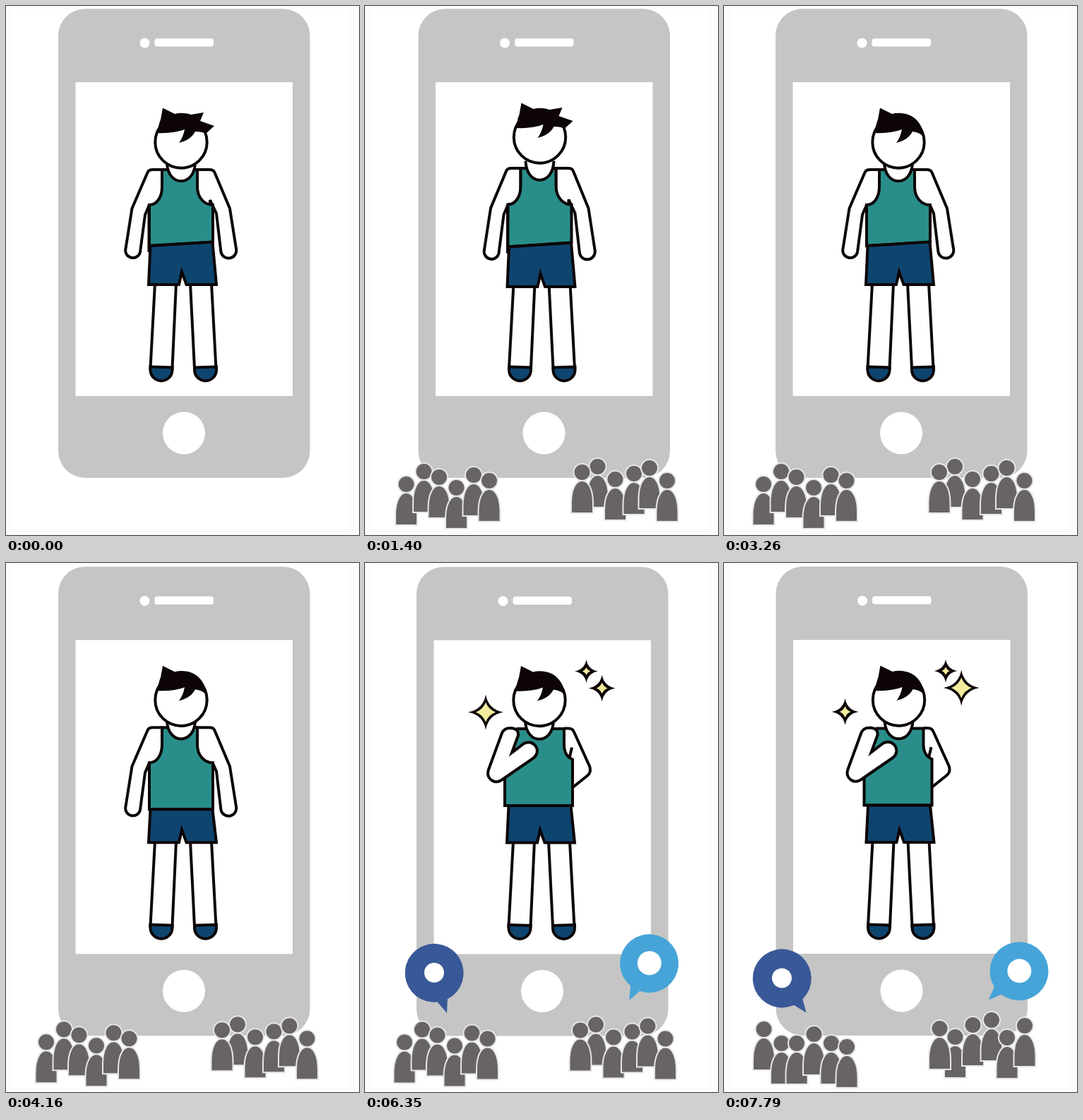
These frames come from a looping animation (500 by 750 pixels, 9990 ms). An HTML page:

```html
<!DOCTYPE html>
<html lang="en">
<head>
<meta charset="utf-8">
<title>Getting ready for the audience</title>
<style>
  html, body { margin: 0; width: 100%; height: 100%; overflow: hidden; background: #fcfcfc; }
  svg { display: block; width: 100vw; height: 100vh; }
  .ink { stroke: #0c0406; stroke-width: 4; fill: #fff; }
  .shirt { fill: #298e8a; }
  .navy { fill: #0e456f; }
  .hair { fill: #0c0406; }
  .crowd { fill: #686464; stroke: #e6e6e6; stroke-width: 2; }
</style>
</head>
<body>
<svg id="stage" viewBox="0 0 500 750"></svg>
<script>
const LOOP = 9990;
const stage = document.getElementById('stage');

const path = (d, cls = 'ink', extra = '') => `<path class="${cls}" d="${d}" ${extra}/>`;
const circle = (x, y, r, attrs) => `<circle cx="${x}" cy="${y}" r="${r}" ${attrs}/>`;
const group = (transform, content) => `<g transform="${transform}">${content}</g>`;

function phone() {
  return `<rect x="74" y="4" width="356.5" height="665" rx="38" fill="#c5c5c5"/>
    <g fill="#fff"><rect x="98.5" y="108" width="307.5" height="445"/>
    <rect x="210.5" y="46" width="83.5" height="11.5" rx="4"/>
    <circle cx="196.5" cy="52.5" r="7"/><circle cx="252" cy="605.5" r="30"/></g>`;
}

function legs() {
  return path('M211 393L204.5 514H235.5L241 393') +
    path('M261 393L267 514H297.5L291 393') +
    path('M204.5 511.5L235.5 512.5V516A15.5 15.5 0 0 1 204.5 516Z', 'ink navy') +
    path('M267 512.5L298 511.5V516A15.5 15.5 0 0 1 267 516Z', 'ink navy');
}

const shorts = (left, right) =>
  path(`M204.5 ${left}L202 395H245L249 377L255.5 395H298L292.5 ${right}Z`, 'ink navy');

const collar = path('M228 222C229 257 267 257 268 222');

function head(messy) {
  const front = messy
    ? 'L280 151L275 163L295 170L283 181Q278 178 268 178'
    : 'Q281 161 285 187Q279 179 268 178';
  return circle(248, 193, 36.7, 'class="ink"') +
    path('M214 180Q217 165 219 161L222 144.5L239 153Q250 150 262 154' + front +
      'Q262 190 245 194Q251 186 253 175Q238 181 214 180Z', 'hair');
}

const leftArm = strap =>
  path(`M${strap} 232H208Q202 232 200.5 236L178.5 287L169.5 344A10.5 10.5 0 0 0 190 349L197 296L203 282L${strap} 282Z`);

const rightArm = messy =>
  path('M271 232H288Q294 232 295.5 236L317 287L326 344A10.5 10.5 0 0 1 304.5 349L298 294' +
    (messy ? 'L289 275V283' : 'L293 283') + 'L271 282Z');

const raisedArm = angle => group(`rotate(${angle} 285 240)`,
  path('M273 232L291 222L306 203L269 165A10.5 10.5 0 0 1 285 151L326 191Q333 198 328 207L295 254L293.5 308'));

function shirt(strapL, strapR, sideL, hemL, hemR) {
  return path(`M${strapL} 232H${strapR}V256C${strapR} 272 281 282 293 282V${hemR}L${sideL} ${hemL}V282` +
    `C${sideL + 10} 282 ${strapL} 272 ${strapL} 256Z`, 'ink shirt');
}

function standing({ messy = false, hem = [340, 334.5] }) {
  const stub = messy ? path('M202.5 282V349') : '';
  return leftArm(221) + rightArm(messy) + stub + shirt(221, 271, 203, ...hem) +
    shorts(...hem) + collar;
}

function combing(angle) {
  return leftArm(224) + path('M202.5 283V292') + raisedArm(angle) +
    shirt(224, 275, 206, 340, 334.5) + shorts(340, 334.5) + collar;
}

function proud() {
  return path('M283 233H289Q295 233 297 238L319 286.5Q322 295 316 300L296 316H283') +
    path('M217 233.5H283V256Q283 272 295 277V342.5H199V290Z', 'ink shirt') +
    path('M294 260L290.5 275') + shorts(342.5, 342.5) + collar;
}

const foldedArm =
  path('M209 267.5L218 243Q219 233 207 232.5Q198 232.5 195 239.5L176 291.5C172 303 183 313 194 306.5' +
    'L239 275.5A12 12 0 0 0 226 254.5Z');

function man({ pose, messy, hem, angle = 0 }) {
  if (pose === 'proud') return legs() + proud() + head(false) + foldedArm;
  if (pose === 'comb') {
    return legs() + combing(angle) + head(messy) + raisedArm(angle);
  }
  const body = standing({ messy, hem });
  if (pose !== 'startled') return legs() + body + head(messy);
  return group('translate(-2 0)', legs()) +
    group('matrix(1 0 0 1.031 -2 -9.2)', body) +
    group('translate(-2 -7)', head(messy));
}

function star(r, bend, fill) {
  const c = r * bend;
  return `<path fill="${fill}" d="M0 ${-r}Q${c} ${-c} ${r} 0Q${c} ${c} 0 ${r}Q${-c} ${c} ${-r} 0Q${-c} ${-c} 0 ${-r}Z"/>`;
}

const sparkle = (x, y, r) =>
  group(`translate(${x} ${y})`, star(r, .15, '#0c0406') + star(r - 11, .28, '#f3ec9c'));

const sparkles = swapped =>
  sparkle(172, 210, swapped ? 19 : 25) + sparkle(314.5, 152, 16.5) +
  sparkle(336.7, 176, swapped ? 25.5 : 19);

// The bubble leans around the tip of its tail.
const bubble = (x, y, lean, color, markSize) => group(`translate(${x} ${y}) rotate(${lean})`,
  `<path fill="${color}" d="M-9 -21L0 0L8 -22Z"/>` +
  circle(0, -59.5, 41.5, `fill="${color}"`) + circle(0, -60, markSize, 'fill="#fff"'));

const bubbles = swapped =>
  bubble(117, 636.5, swapped ? -35.2 : -17.5, '#395898', 14) +
  bubble(375.2, 618.5, swapped ? 46.7 : 28.5, '#46a4d8', 17);

// Each person: x, foot level, hop.
const leftCrowd = [[57, 736, -18], [82, 718, 20], [103.5, 726, 12],
  [128, 741, -16], [152.5, 723, 15], [174.5, 731, 12]];
const rightCrowd = [[328, 711, 18], [306, 719, -2], [353, 729, -17],
  [379.5, 721, -16], [401.5, 713, 17], [426.5, 731, -18]];

const person = (x, y) => group(`translate(${x} ${y})`,
  path('M-15.5 0V-14C-15.5 -34 -9 -46 0 -46S15.5 -34 15.5 -14V0Z', 'crowd') +
  circle(0, -58, 12, 'class="crowd"'));

function crowd({ count = 6, out = [0, 0], drop = 0, swapped }) {
  const place = (people, dx) => people
    .map(([x, y, hop]) => person(x + dx, y + drop + (swapped ? hop : 0))).join('');
  return place(leftCrowd.slice(0, count), -out[0]) + place(rightCrowd.slice(6 - count), out[1]);
}

const show = { pose: 'proud', shine: true, talk: true };
const low = { ...show, dx: -1, dy: 1.5 };
const high = { ...show, dx: -.5, dy: 1, swapped: true };
const steps = [
  { at: 0, messy: true, count: 0 },
  { at: 370, messy: true, count: 1, out: [1, 23], drop: -60 },
  { at: 600, messy: true, dy: 1, count: 3, out: [12, 23], drop: 4 },
  { at: 830, messy: true, dx: 1, dy: 1, count: 4, out: [12, 23], drop: 8 },
  { at: 1100, messy: true, dy: 1, out: [18, 38] },
  { at: 1400, messy: true, pose: 'startled', dx: 1.5 },
  { at: 1730, messy: true },
  { at: 2060, messy: true, pose: 'comb', angle: 6, dy: 1 },
  { at: 2460, pose: 'comb' },
  { at: 2860, pose: 'comb', angle: 4, dy: 1 },
  { at: 3260, dx: -1 },
  { at: 3690, dx: -1, hem: [344, 344] },
  { at: 4160, dy: 1.2, hem: [348, 348] },
  { at: 4660, pose: 'proud', shine: true },
  { at: 5090, ...high },
  { at: 5520, ...low },
  { at: 5950, ...high },
  { at: 6350, ...low },
  { at: 6820, ...high },
  { at: 7320, ...low },
  { at: 7790, ...high }
];

function draw(step) {
  const { dx = 0, dy = 0, shine, talk, swapped } = step;
  stage.innerHTML = '<rect x="11" y="4" width="476" height="740" fill="#fff"/>' +
    group(`translate(${dx} ${dy})`, phone() + man(step) +
      (shine ? sparkles(swapped) : '') + (talk ? bubbles(swapped) : '') + crowd(step));
}

let current;
function tick() {
  const time = performance.now() % LOOP;
  const step = steps.findLast(s => s.at <= time);
  if (step !== current) draw(current = step);
  requestAnimationFrame(tick);
}
tick();
</script>
</body>
</html>
```
